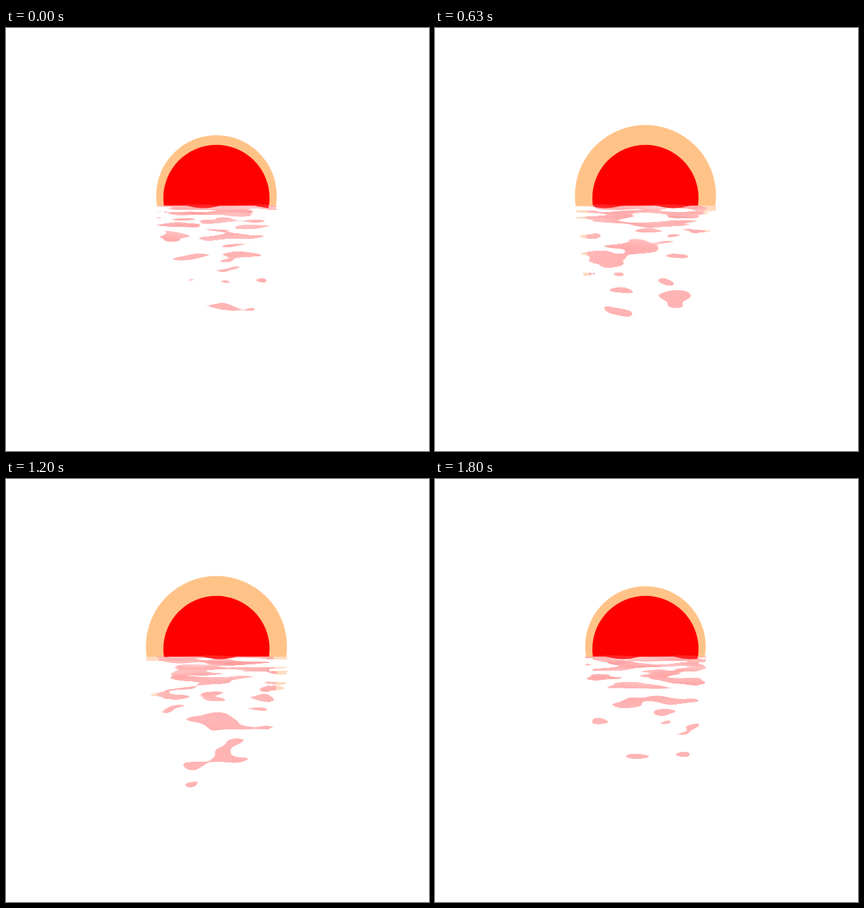
These frames come from a looping animation (600 by 600 pixels, 1.83 s). An HTML page with a canvas:

```html
<!DOCTYPE html>
<html lang="en">
<head>
<meta charset="utf-8">
<title>Sunset</title>
<style>
html, body { margin: 0; width: 100%; height: 100%; overflow: hidden; background: #fff; }
canvas { display: block; width: 600px; height: 600px; }
</style>
</head>
<body>
<canvas id="c" width="600" height="600"></canvas>
<script>
const ctx = document.getElementById('c').getContext('2d');
const LOOP = 1830, STEP = 30;
const CX = 298.5, HORIZON = 252, SUN = 75.3;
const HALO_MIN = 85.5, HALO_MAX = 107.6;
const LEFT = 184, WIDTH = 230, DEPTH = 210;
const water = ctx.createImageData(WIDTH, DEPTH);

const clamp = v => Math.max(0, Math.min(1, v));
const mix = (a, b, k) => a + (b - a) * k;
const fade = k => k * k * k * (k * (k * 6 - 15) + 10);

function seeded(seed) {
  return () => (seed = (seed * 16807) % 2147483647) / 2147483647;
}

// shuffled lattice for gradient noise
const random = seeded(4711);
const lattice = Array.from({ length: 256 }, (_, i) => i);
for (let i = 255; i > 0; i--) {
  const j = Math.floor(random() * (i + 1));
  [lattice[i], lattice[j]] = [lattice[j], lattice[i]];
}
const perm = Uint8Array.from({ length: 512 }, (_, i) => lattice[i & 255]);

function slope(h, x, y, z) {
  h &= 15;
  const u = h < 8 ? x : y;
  const v = h < 4 ? y : h === 12 || h === 14 ? x : z;
  return (h & 1 ? -u : u) + (h & 2 ? -v : v);
}

function noise(x, y, z) {
  const xi = Math.floor(x), yi = Math.floor(y), zi = Math.floor(z);
  x -= xi; y -= yi; z -= zi;
  const fx = fade(x), fy = fade(y), fz = fade(z);
  const at = (i, j, k) => {
    const h = perm[perm[perm[(xi + i) & 255] + ((yi + j) & 255)] + ((zi + k) & 255)];
    return slope(h, x - i, y - j, z - k);
  };
  const row = (j, k) => mix(at(0, j, k), at(1, j, k), fx);
  return mix(mix(row(0, 0), row(1, 0), fy), mix(row(0, 1), row(1, 1), fy), fz);
}

function haloRadius(t) {
  return mix(HALO_MIN, HALO_MAX, Math.pow(Math.sin(Math.PI * t / LOOP), 3.35));
}

// half width of an ellipse hanging from the horizon
const reach = (width, depth, d) => width * Math.sqrt(Math.max(0, 1 - (d / depth) ** 2));

// waves widen and thin out towards the viewer
function drawWater(t, halo) {
  const px = water.data.fill(255);
  const spare = HALO_MAX - halo;
  for (let d = 0; d < DEPTH; d++) {
    const spacing = 7 + d * 0.18;
    const v = Math.log(1 + d * 0.026) / 0.18 * 1.8;
    const wide = reach(halo, DEPTH, d);
    const red = reach(SUN + spare * 0.6, 165 + spare * 9, d);
    const sparse = -0.25 + 0.055 * Math.sqrt(d) - 0.5 * Math.exp(-d / 3);
    for (let i = 0; i < WIDTH; i++) {
      const x = LEFT + i - CX, off = Math.abs(x);
      if (off >= wide) continue;
      const sway = 0.25 * Math.sin(x / 37 + v * 0.6 + t / 500);
      const n = noise(x / 46 + 20, v + sway + 20, t / 260);
      const limit = sparse + 0.3 * (off / wide) ** 6 + (off > SUN ? 0.08 : 0);
      const alpha = clamp((n - limit) * spacing * 1.2 + 0.5);
      if (!alpha) continue;

      const inSun = clamp(red + n * 14 - off);
      const tone = 180 + 45 * Math.exp(-d / 45) * noise(x / 60, v * 0.8, t / 300 + 9);
      const o = (d * WIDTH + i) * 4;
      px[o + 1] = mix(255, mix(220, tone, inSun), alpha);
      px[o + 2] = mix(255, mix(192, tone, inSun), alpha);
    }
  }
  ctx.putImageData(water, LEFT, HORIZON);
}

function disc(y, r, color) {
  ctx.fillStyle = color;
  ctx.beginPath();
  ctx.arc(CX, y, r, 0, Math.PI * 2);
  ctx.fill();
}

// ripples lapping over the foot of the sun
function drawRipple(t) {
  const wave = (x, s) => Math.sin(x * 0.065 + t * 0.004 + s);
  ctx.fillStyle = '#ff2424';
  ctx.beginPath();
  for (let x = 224; x <= 373; x += 3) ctx.lineTo(x, 251 + 0.8 * wave(x, 0));
  for (let x = 373; x >= 224; x -= 3) ctx.lineTo(x, 252 + Math.max(0, 3.5 * wave(x, 2.2)));
  ctx.fill();
}

function draw(t) {
  const halo = haloRadius(t);
  ctx.fillStyle = '#fff';
  ctx.fillRect(0, 0, 600, 600);
  drawWater(t, halo);

  ctx.save();
  ctx.beginPath();
  ctx.rect(0, 0, 600, HORIZON);
  ctx.clip();
  disc(237.6, halo, '#ffc388');
  disc(241, SUN, '#ff0000');
  ctx.restore();
  drawRipple(t);
}

const start = performance.now();
let shown = -1;
function frame() {
  const t = (performance.now() - start) % LOOP;
  const step = Math.floor(t / STEP) * STEP;
  if (step !== shown) draw(shown = step);
  requestAnimationFrame(frame);
}
frame();
</script>
</body>
</html>
```
